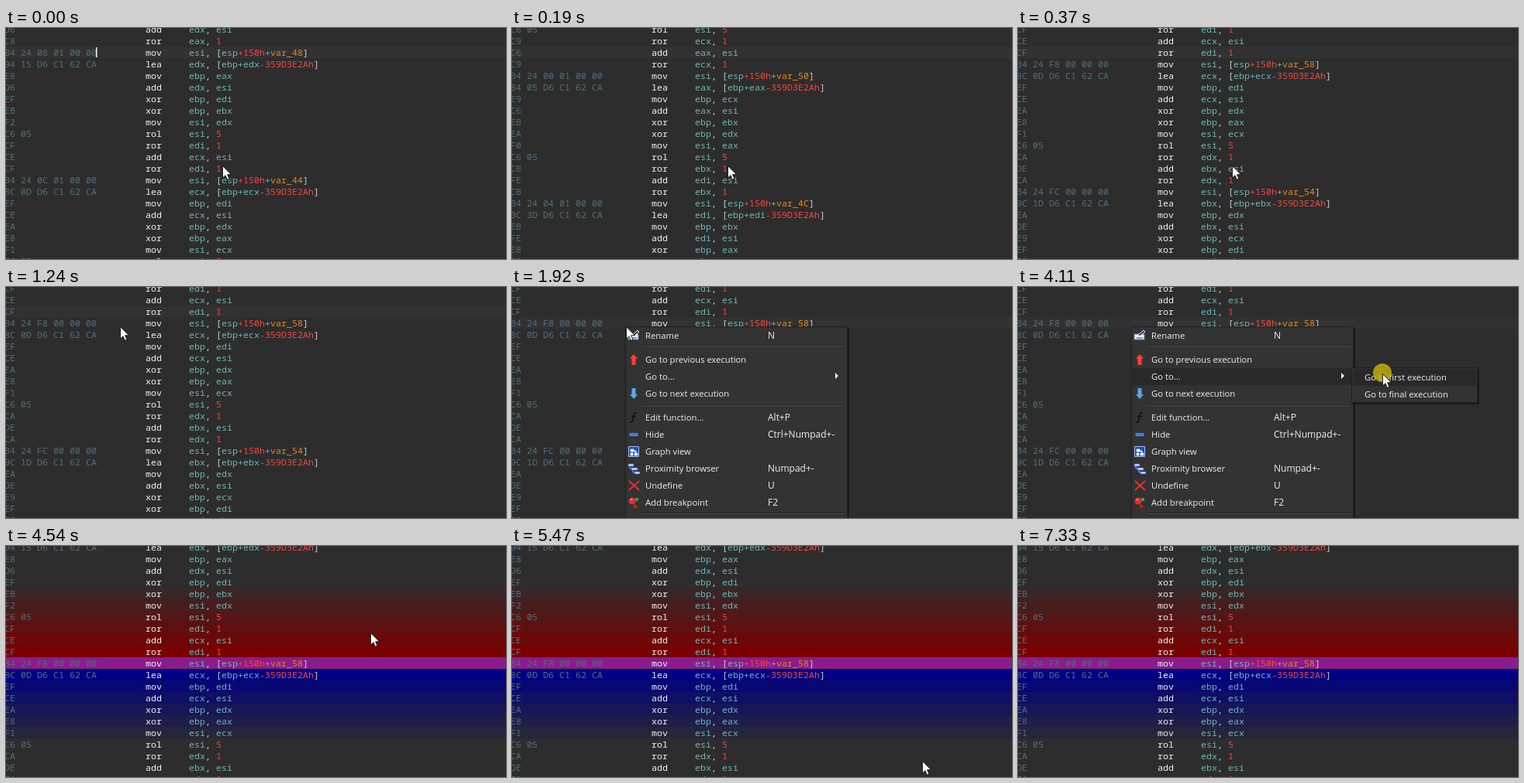
An HTML page with a canvas for the animation above (8510 ms loop, 645 by 299 pixels).

```html
<!DOCTYPE html>
<html lang="en">
<head>
<meta charset="utf-8">
<title>Trace navigation</title>
<style>
html, body { margin: 0; width: 100%; height: 100%; overflow: hidden; background: #2d2d2d; }
canvas { display: block; width: 100%; height: 100%; }
</style>
</head>
<body>
<canvas id="stage" width="645" height="299"></canvas>
<script>
const ctx = document.getElementById('stage').getContext('2d');
const LOOP = 8510, ROW = 15, CHAR = 7, TOP = -6, LEFT = -2;
const CODE_FONT = '11.667px "Noto Sans Mono", monospace';
const MENU_FONT = '11.25px "Open Sans", sans-serif';
const KEY_FONT = '12px "Open Sans", sans-serif';
const BACK = [45, 45, 45], PAST = [120, 0, 0], FUTURE = [0, 0, 130];
const MENU = '#333333', HOVER = '#292929', EDGE = '#202020';

// ---- timing ----
// Fraction from 0 to 1 in n held steps; the first falls at start, the last at end.
function steps(t, start, end, n) {
  if (t < start) return 0;
  return Math.min(n, Math.floor((t - start) / (end - start) * (n - 1) + 1e-6) + 1) / n;
}
const smooth = f => f * f * (3 - 2 * f);

// start, end, step count, x, y
const moves = [
  [60, 370, 6, 276, 178],
  [820, 1240, 7, 147, 51],
  [2110, 2670, 10, 326, 101],
  [2870, 2990, 3, 297, 108],
  [3120, 3680, 8, 394, 112],
  [3740, 4110, 7, 470, 112],
  [4730, 5150, 8, 528, 275],
  [5360, 5470, 3, 529, 278],
  [7270, 7330, 2, 552, 299]
];

function pointerAt(t) {
  let x = 279, y = 178;
  for (const [start, end, n, toX, toY] of moves) {
    const f = smooth(steps(t, start, end, n));
    x += (toX - x) * f;
    y += (toY - y) * f;
  }
  return [Math.round(x), Math.round(y)];
}

// ---- drawing helpers ----
function rect(color, x, y, w, h) {
  ctx.fillStyle = color;
  ctx.fillRect(x, y, w, h);
}
function text(string, x, y, color, font) {
  ctx.font = font;
  ctx.fillStyle = color;
  ctx.fillText(string, x, y);
}
function disc(color, x, y, r) {
  ctx.fillStyle = color;
  ctx.beginPath();
  ctx.arc(x, y, r, 0, 2 * Math.PI);
  ctx.fill();
}
function shape(path, x, y, fill, stroke, width = 1) {
  ctx.save();
  ctx.translate(x, y);
  const p = new Path2D(path);
  if (fill) { ctx.fillStyle = fill; ctx.fill(p); }
  if (stroke) { ctx.strokeStyle = stroke; ctx.lineWidth = width; ctx.stroke(p); }
  ctx.restore();
}

// ---- disassembly: unrolled hash rounds of 11 instructions, five rotating registers ----
const cycle = ['ecx', 'ebx', 'eax', 'edi', 'edx'];
const regCode = { eax: 0, ecx: 1, edx: 2, ebx: 3, edi: 7 };
const hex = n => n.toString(16).toUpperCase().padStart(2, '0');

function instruction(n) {
  const round = Math.floor(n / 11);
  const reg = i => cycle[((round + i) % 5 + 5) % 5];
  const code = (base, i, scale = 1) => hex(base + scale * regCode[reg(i)]);
  const slot = 0x58 - 4 * round, offset = 0x150 - slot;
  const ror = () => [code(0xC8, 4), 'ror', `${reg(4)}, 1`];
  const add = i => [code(0xC6, i, 8), 'add', `${reg(i)}, esi`];
  const xor = i => [code(0xE8, i), 'xor', `ebp, ${reg(i)}`];
  return [
    () => [`B4 24 ${hex(offset & 255)} ${hex(offset >> 8)} 00 00`, 'mov', `esi, [esp+150h+var_${hex(slot)}]`],
    () => [`${code(0x84, 0, 8)} ${code(5, 0, 8)} D6 C1 62 CA`, 'lea', `${reg(0)}, [ebp+${reg(0)}-359D3E2Ah]`],
    () => [code(0xE8, 3), 'mov', `ebp, ${reg(3)}`],
    () => add(0),
    () => xor(4),
    () => xor(2),
    () => [code(0xF0, 0), 'mov', `esi, ${reg(0)}`],
    () => ['C6 05', 'rol', 'esi, 5'],
    ror,
    () => add(1),
    ror
  ][n - 11 * round]();
}

function tokenColor(token) {
  if (token[0] === 'v') return '#e8891c';
  if (/\d/.test(token)) return '#f4483f';
  if (token[0] === 'e' || token === '+') return '#72b5b5';
  return '#c4d0d4';
}

function traceColor(n) {
  if (n === 0) return 'rgb(139,28,139)';
  const strength = Math.max(0, 7 - Math.abs(n)) / 6;
  const goal = n < 0 ? PAST : FUTURE;
  return `rgb(${BACK.map((c, i) => Math.round(c + (goal[i] - c) * strength))})`;
}

function drawCode(first, currentRow, traced) {
  for (let k = 0; k <= 20; k++) {
    const n = first + k, y = TOP + k * ROW, base = y + 12;
    if (traced) rect(traceColor(n), 0, y, 645, ROW);
    else if (k === currentRow) rect('#323232', 0, y, 645, ROW);
    const [bytes, name, operands] = instruction(n);
    text(bytes, LEFT, base, '#546f7c', CODE_FONT);
    text(name, LEFT + 26 * CHAR, base, '#f2f2f2', CODE_FONT);
    for (const m of operands.matchAll(/var_\w+|e[a-z]{2}|[+-]?\d\w*|\S/g))
      text(m[0], LEFT + (34 + m.index) * CHAR, base, tokenColor(m[0]), CODE_FONT);
  }
}

// ---- context menu; icons are drawn around (0, 0) ----
const arrowUp = 'M0 -7L5 -1H2.5V7H-2.5V-1H-5Z';
const arrowDown = 'M0 7L5 1H2.5V-7H-2.5V1H-5Z';
const icons = {
  rename(x, y) {
    shape('M-7 -2H6V5H-7Z', x, y, '#e9eef6', '#5d7fc0');
    shape('M-4 3H4', x, y, null, '#27408b');
    shape('M-2 1L-1 -2L5 -7L7 -5L1 0Z', x, y, '#3a3a3a', '#f4f4f4');
  },
  up: (x, y) => shape(arrowUp, x, y, '#fb4038'),
  down: (x, y) => shape(arrowDown, x, y, '#5aa5ea'),
  func: (x, y) => shape('M4 -6Q1 -8 0 -3L-1.5 4Q-2 7 -5 6M-3 -1.5H3', x, y, null, '#0d0d14', 1.5),
  hide: (x, y) => shape('M-5 -1.5H5V1.5H-5Z', x, y, '#2f6fe8', '#69a0ff', .8),
  graph(x, y) {
    shape('M-6.5 -6.5H6.5V6.5H-6.5Z', x, y, '#1f4fae', '#9dc0f5');
    shape('M-4 -3H0V0H-4ZM1 2H5V5H1ZM-4 2H-1V5H-4ZM-2 0V2M0 -1H3V2', x, y, '#f4f8ff', '#f4f8ff', .7);
  },
  proximity(x, y) {
    shape('M-7 -6H0V-3H-7ZM-3 -1H5V2H-3ZM1 4H8V7H1Z', x, y, '#e8effc', '#2b5bc4');
    shape('M-5 -3V0H-3M-1 2V5H1', x, y, null, '#7fa6ee');
  },
  undefine: (x, y) => shape('M-6 -6L7 6M7 -6L-6 6', x, y, null, '#ee2f2a', 1.8),
  breakpoint(x, y) {
    disc('#d8322b', x - 2, y - 2, 4.5);
    disc('#f07a70', x - 3, y - 4, 1.5);
    disc('#4f9b45', x + 4, y - 4, 2.3);
    disc('#b5231e', x + 2, y + 5, 2.5);
  }
};
const items = [
  [63, 'Rename', 'N', 'rename'],
  [94, 'Go to previous execution', '', 'up'],
  [116, 'Go to...', '', ''],
  [138, 'Go to next execution', '', 'down'],
  [169, 'Edit function...', 'Alt+P', 'func'],
  [191, 'Hide', 'Ctrl+Numpad+-', 'hide'],
  [213, 'Graph view', '', 'graph'],
  [235, 'Proximity browser', 'Numpad+-', 'proximity'],
  [257, 'Undefine', 'U', 'undefine'],
  [279, 'Add breakpoint', 'F2', 'breakpoint']
];
const subItems = [[117, 'Go to first execution'], [139, 'Go to final execution']];

function panel(x, y, w, h) {
  rect('rgba(0,0,0,.4)', x + 2, y + 2, w, h);
  rect(EDGE, x, y, w, h);
  rect(MENU, x + 1, y + 1, w - 2, h - 2);
}

function drawMenu(pointerY) {
  panel(146, 51, 287, 260);
  for (const y of [76, 153, 293]) {
    rect('#242424', 166, y - 1, 263, 1);
    rect('#4c4c4c', 166, y, 263, 1);
  }
  for (const [y, label, key, icon] of items) {
    if (pointerY >= y - 11 && pointerY < y + 11) rect(HOVER, 148, y - 11, 283, 22);
    if (icon) icons[icon](157, y);
    text(label, 172, y + 4, '#f0f0f0', MENU_FONT);
    text(key, 330, y + 4, '#f0f0f0', KEY_FONT);
  }
  shape('M0 -4L4 0L0 4Z', 417, 115, '#f0f0f0');
}

function drawSubmenu([x, y]) {
  panel(430, 104, 163, 46);
  for (const [center, label] of subItems) {
    if (x > 431 && Math.abs(y - center) < 11) rect(HOVER, 432, center - 11, 159, 22);
    text(label, 447, center + 4, '#f0f0f0', MENU_FONT);
  }
}

function faded(alpha, draw) {
  if (alpha <= 0) return;
  ctx.globalAlpha = alpha;
  draw();
  ctx.globalAlpha = 1;
}

function draw(t) {
  const traced = t >= 4540;
  const pointer = pointerAt(t);
  const scroll = 3 * Math.round(15 * steps(t, 60, 370, 6));
  rect(`rgb(${BACK})`, 0, 0, 645, 299);
  drawCode(traced ? -10 : 42 - scroll, t < 1490 ? 2 : 3, traced);
  if (t < 60 || (t >= 550 && t < 1060)) rect('#f4f4f4', 116, 25, 1.5, 13);

  if (!traced) {
    faded(steps(t, 1560, 1920, 6), () => drawMenu(pointer[1]));
    faded(steps(t, 3240, 3370, 3), () => drawSubmenu(pointer));
  }
  const click = t >= 1490 && t < 1920 ? 1 - steps(t, 1560, 1920, 6)
    : t >= 4050 && !traced ? 1 : 0;
  faded(click, () => disc('rgba(200,184,12,.8)', pointer[0], pointer[1] - 1, 12));

  if (t < 7330)
    shape('M.5 .5V16L4 12.7L6.4 18.3L9 17.2L6.6 11.7H11.5Z', ...pointer, '#fff', '#111', .9);
}

function frame(now) {
  draw(now % LOOP);
  requestAnimationFrame(frame);
}
requestAnimationFrame(frame);
</script>
</body>
</html>
```
